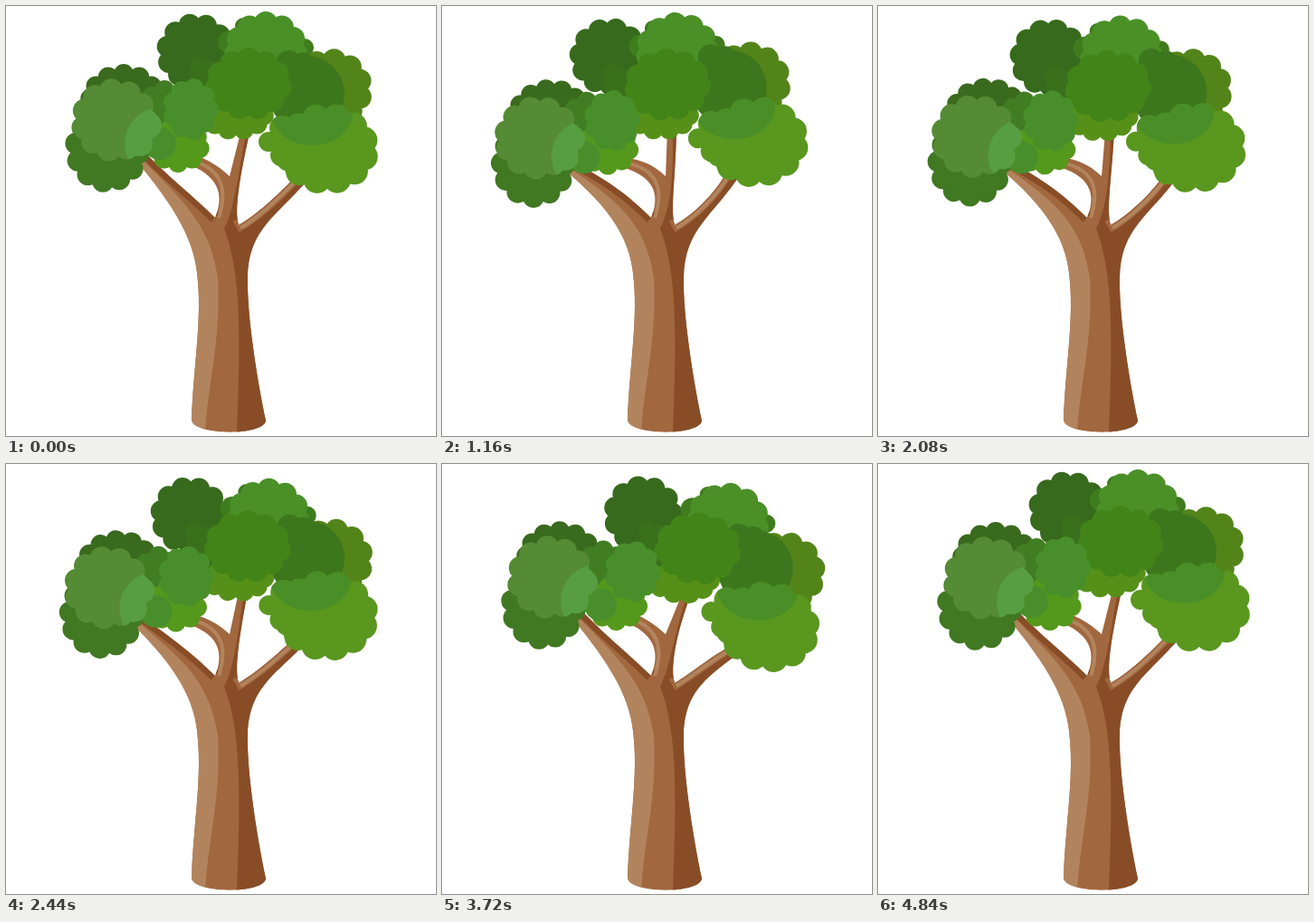
Write an HTML page with a canvas that moves like this. It is 475 by 475 pixels and loops after 5 s.

```html
<!DOCTYPE html>
<html lang="en">
<head>
<meta charset="utf-8">
<title>Swaying tree</title>
<style>
html, body { margin: 0; width: 100%; height: 100%; overflow: hidden; background: #fff; }
canvas { display: block; width: 475px; height: 475px; }
</style>
</head>
<body>
<canvas id="stage" width="475" height="475"></canvas>
<script>
const ctx = document.getElementById('stage').getContext('2d');
const LOOP = 5000, STEP = 40;
const KEYS = [0, 1560, 3280, 4840];
const BARK = { light: '#b2845d', mid: '#a1673f', dark: '#884d27' };
const still = [0, 0, 0];

// Weights of the left and right lean at a time.
function lean(t) {
  if (t >= KEYS[3]) return [0, 0];
  const k = t < KEYS[1] ? 0 : t < KEYS[2] ? 1 : 2;
  const f = (t - KEYS[k]) / (KEYS[k + 1] - KEYS[k]);
  const e = (1 - Math.cos(Math.PI * f)) / 2;
  return [[e, 0], [1 - e, e], [0, 1 - e]][k];
}

const mix = (L, R, w) => still.map((_, i) => L[i] * w[0] + R[i] * w[1]);

function addEllipse(path, x, y, rx, ry = rx) {
  path.moveTo(x + rx, y);
  path.ellipse(x, y, rx, ry, 0, 0, 2 * Math.PI);
}

// A scalloped crown: an ellipse ringed by round lobes, centred on 0,0.
function crown(rx, ry, lobes, r, turn) {
  const path = new Path2D(), a = rx - r, b = ry - r;
  addEllipse(path, 0, 0, a, b);
  for (let i = 0; i < lobes; i++) {
    const q = (turn + i * 360 / lobes) * Math.PI / 180;
    addEllipse(path, a * Math.cos(q), b * Math.sin(q), r);
  }
  return path;
}

function leaf(color, x, y, rx, ry, L, R, opt = {}) {
  const { lobes = 11, r = 12, turn = -90, extra = [], plain, shade } = opt;
  const path = plain ? new Path2D() : crown(rx, ry, lobes, r, turn);
  if (plain) addEllipse(path, 0, 0, rx, ry);
  extra.forEach(([ex, ey, er]) => addEllipse(path, ex - x, ey - y, er));
  return { color, x, y, L, R, path, shade };
}

// Lean: [dx, dy, degrees]
const topL = [-32, 1, -6], topR = [35, 18, 8];
const leftL = [-13, 20, -9], leftR = [0, -1, 0];
const midL = [-22, 1, -4], midR = [18, 9, 4];

const leaves = [
  leaf('#376a1c', 210, 51, 44, 43, [-30, 6, -8], [15, 6, 3], { turn: -70 }),
  leaf('#3f7c1d', 286, 47, 34, 30, topL, topR,
    { extra: [[262, 22, 9], [247, 40, 13], [330, 46, 10]] }),
  leaf('#4a9027', 287, 48, 46, 42, topL, topR, { r: 13 }),
  leaf('#53841a', 358, 92, 47, 45, [-23, -9, -4], [23, 34, 10], { r: 13, turn: -50 }),
  leaf('#3c771d', 332, 97, 42, 42, [-18, -8, 0], [17, 22, 4],
    { plain: true, extra: [[312, 63, 14], [328, 63, 12]] }),
  leaf('#569019', 254, 118, 42, 30, [-14, 0, 0], [14, 8, 3], { r: 11 }),
  leaf('#3a701c', 222, 84, 16, 24, [-28, 10, 0], [18, 8, 0],
    { plain: true, extra: [[212, 66, 10], [214, 80, 11]] }),
  leaf('#438419', 268, 86, 48, 40, midL, midR, { r: 13 }),
  leaf('#59971f', 354, 158, 58, 50, [-8, -9, -4], [7, 27, 10], {
    lobes: 12, r: 15, turn: -106,
    extra: [[290, 150, 11], [304, 165, 12], [305, 135, 14], [320, 180, 12]],
    shade: { color: '#4a8e27', x: 338, y: 118, rx: 45, ry: 36, L: [-18, -8, 0], R: [13, 23, 4] }
  }),
  leaf('#3a6a1d', 130, 106, 48, 42, leftL, leftR, { lobes: 13, r: 11 }),
  leaf('#417822', 112, 157, 47, 49, leftL, leftR, { lobes: 12, r: 12, turn: -82 }),
  leaf('#417d23', 175, 122, 32, 40, [-15, 15, -5], [4, 3, 0], { lobes: 9, r: 11 }),
  leaf('#54991b', 190, 154, 35, 30, [-9, 3, -3], [3, 0, 0], { lobes: 9, r: 11, turn: 10 }),
  leaf('#488f2b', 204, 114, 31, 34, [-19, 15, -5], [8, 6, 3],
    { lobes: 9, r: 11, turn: -80, extra: [[170, 152, 18]] }),
  leaf('#558b34', 120, 126, 48, 46, [-17, 23, -9], leftR, {
    r: 13, turn: -96, extra: [[158, 132, 14], [148, 152, 14]],
    shade: { color: '#579e43', x: 172, y: 152, rx: 41, ry: 40, L: [-12, 16, -9], R: leftR }
  })
];

function place(part, w) {
  const [dx, dy, deg] = mix(part.L, part.R, w);
  ctx.translate(part.x + dx, part.y + dy);
  ctx.rotate(deg * Math.PI / 180);
}

function drawLeaf(part, w) {
  ctx.save();
  place(part, w);
  ctx.fillStyle = part.color;
  ctx.fill(part.path);
  if (part.shade) {
    const s = part.shade, oval = new Path2D();
    ctx.clip(part.path);
    ctx.setTransform(1, 0, 0, 1, 0, 0);
    place(s, w);
    addEllipse(oval, 0, 0, s.rx, s.ry);
    ctx.fillStyle = s.color;
    ctx.fill(oval);
  }
  ctx.restore();
}

function drawTrunk(w) {
  const tip = (L, R) => {
    const [dx, dy] = mix([...L, 0], [...R, 0], w);
    return (x, y) => `${x + dx} ${y + dy}`;
  };
  const left = tip([-9, 15], [0, -1]), twig = tip([-4, 3], [2, 0]);
  const mid = tip([-12, 0], [6, 8]), right = tip([-6, -6], [5, 13]);
  const paint = (color, d) => {
    ctx.fillStyle = color;
    ctx.fill(new Path2D(d));
  };
  const line = (color, width, d) => {
    ctx.strokeStyle = color;
    ctx.lineWidth = width;
    ctx.stroke(new Path2D(d));
  };
  const body = new Path2D(`M205 457 C207 400 216 350 212 305
    C210 262 190 225 ${left(139, 165)} L${left(152, 160)} C180 190 205 208 231 234
    C240 212 238 190 ${twig(204, 176)} L${twig(212, 166)} C228 172 238 180 247 188
    L${mid(259, 140)} L${mid(269, 140)} C258 190 252 225 257 242
    C275 232 300 210 ${right(320, 188)} L${right(336, 189)}
    C300 232 268 245 267 300 C266 340 277 410 287 458 C285 475 207 475 205 457Z`);

  ctx.save();
  ctx.fillStyle = BARK.mid;
  ctx.fill(body);
  ctx.clip(body);
  paint(BARK.light, `M${left(130, 163)} L${left(145, 164)} C195 215 225 240 234 300
    C238 370 222 420 220 475 L190 475 L190 300Z`);
  paint(BARK.dark, `M241 246 C262 300 258 380 255 475 L300 475 L300 300
    L${right(345, 190)} L${right(320, 180)} L257 243 L${mid(272, 140)}
    L${mid(265, 140)} C256 190 252 225 241 246Z`);
  line(BARK.dark, 13, `M${left(152, 160)} C180 190 205 208 231 234`);
  line(BARK.mid, 14, `M254 244 C275 232 300 210 ${right(320, 188)}`);
  line(BARK.light, 4, `M259 245 C277 235 302 213 ${right(323, 190)}`);
  line(BARK.light, 4, `M${twig(207, 171)} C236 180 246 200 235 234`);
  ctx.restore();
}

function frame(now) {
  const t = Math.floor(now % LOOP / STEP) * STEP;
  const w = lean(t);
  ctx.fillStyle = '#fff';
  ctx.fillRect(0, 0, 475, 475);
  drawTrunk(w);
  leaves.forEach(part => drawLeaf(part, w));
}

let start;
function tick(now) {
  start ??= now;
  frame(now - start);
  requestAnimationFrame(tick);
}
frame(0);
requestAnimationFrame(tick);
</script>
</body>
</html>
```
